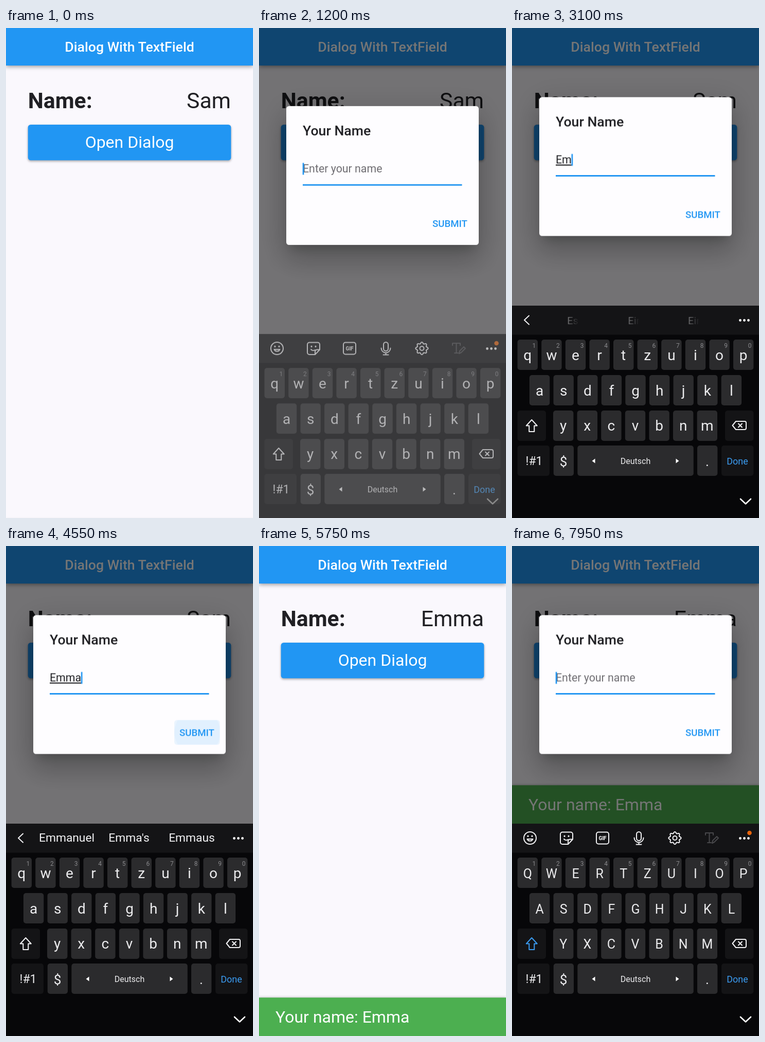
Animation of 480 by 953 pixels, one loop 8 s. Source, as an HTML page:

```html
<!DOCTYPE html>
<html lang="en">
<head>
<meta charset="utf-8">
<title>Dialog With TextField</title>
<style>
html, body { margin: 0; width: 100%; height: 100%; overflow: hidden; background: #faf8fd; }
body { position: relative; font-family: Roboto, "Liberation Sans", sans-serif; }
svg, .layer { position: absolute; left: 0; top: 0; width: 480px; height: 953px; overflow: visible; }
.mid { text-anchor: middle; }
.end { text-anchor: end; }
.medium { font-weight: 500; }
.ink { fill: #202024; }
.white { fill: #fff; }
.blue { fill: #2196f3; }
.line { fill: none; stroke: #f2f2f4; stroke-width: 2; stroke-linecap: round; stroke-linejoin: round; }
#bar { filter: drop-shadow(0 2px 4px rgba(0,0,0,.4)); }
#button { filter: drop-shadow(0 2px 2px rgba(0,0,0,.35)); }
#snack { filter: drop-shadow(0 -1px 2px rgba(0,0,0,.2)); }
#ripple { transform-origin: 240px 222px; }
#tap { transform-origin: 319px 228px; }
#shade { background: rgba(0,0,0,.54); }
#dialog {
  position: absolute; left: 53.3px; top: 340.5px; width: 373.4px; height: 270.5px;
  border-radius: 5.3px; background: #fefdff;
  box-shadow: 0 15px 20px -9px rgba(0,0,0,.2), 0 32px 50px 4px rgba(0,0,0,.14), 0 12px 61px 11px rgba(0,0,0,.12);
}
#dialog svg { width: 373.4px; height: 270.5px; }
.typed { text-decoration: underline; text-decoration-thickness: 1px; text-underline-offset: 2px; }
.key { fill: #2b2b2d; }
.dark { fill: #141416; }
.letter { fill: #ececee; text-anchor: middle; }
.digit { fill: #8a8a8d; font-size: 12px; text-anchor: middle; }
.words { position: absolute; left: 0; top: 540px; width: 480px; height: 56px; }
.words span {
  position: absolute; top: 0; width: 0; height: 56px; display: flex; justify-content: center;
  color: #f2f2f4; font-size: 22.8px; line-height: 56px; white-space: nowrap;
}
.early b {
  font-weight: 400;
  -webkit-mask: linear-gradient(90deg, #000 60px, transparent 84px) 0 0 / 150px 100% no-repeat;
}
</style>
</head>
<body>
<svg id="page">
  <rect id="bar" class="blue" width="480" height="73"/>
  <text class="mid medium white" x="240" y="46" font-size="26.67">Dialog With TextField</text>
  <text class="ink" x="42.7" y="156.3" font-size="42.67" font-weight="700">Name:</text>
  <text class="end ink" id="oldName" x="437" y="156.3" font-size="42.67">Sam</text>
  <text class="end ink" id="newName" x="437" y="156.3" font-size="42.67">Emma</text>
  <clipPath id="buttonClip"><rect x="42.7" y="188" width="394.6" height="69.3" rx="5.3"/></clipPath>
  <rect id="button" class="blue" x="42.7" y="188" width="394.6" height="69.3" rx="5.3"/>
  <g clip-path="url(#buttonClip)"><circle id="ripple" class="white" cx="240" cy="222" r="210"/></g>
  <text class="mid white" x="240" y="233.3" font-size="32">Open Dialog</text>
  <g id="snack">
    <rect x="0" y="878.3" width="480" height="75" fill="#4caf50"/>
    <text class="white" x="32" y="927" font-size="32">Your name: Emma</text>
  </g>
</svg>

<div class="layer" id="modal">
  <div class="layer" id="shade"></div>
  <div id="dialog">
    <svg>
      <text class="ink medium" x="32" y="57.3" font-size="26.67">Your Name</text>
      <g font-size="21.33" id="field">
        <text id="hint" x="32" y="129" fill="#6f6d72">Enter your name</text>
      </g>
      <g id="caretMove"><rect id="caret" class="blue" x="31.7" y="110.5" width="2.7" height="23"/></g>
      <rect x="32" y="152.5" width="309.4" height="1.4" fill="#918f94"/>
      <rect id="focusLine" class="blue" x="32" y="152" width="309.4" height="2.8"/>
      <clipPath id="submitClip"><rect x="274" y="204" width="88.7" height="48" rx="5.3"/></clipPath>
      <g clip-path="url(#submitClip)">
        <rect id="press" class="blue" x="274" y="204" width="88.7" height="48"/>
        <circle id="tap" class="blue" cx="319" cy="228" r="55"/>
      </g>
      <text class="mid medium blue" x="318" y="234.7" font-size="18.67">SUBMIT</text>
    </svg>
  </div>
</div>

<div class="layer" id="keyboard">
  <svg>
    <rect y="596" width="480" height="357" fill="#070709"/>
    <rect y="540" width="480" height="56.5" class="dark"/>
    <g id="tools" class="line">
      <circle cx="35" cy="568" r="12"/>
      <path d="M29.500 570a6 6 0 0 0 11 0z"/>
      <path d="M31 564v.5M39 564v.5M102 564v.5M110 564v.5" stroke-width="3"/>
      <path d="M98 556.500h16a4 4 0 0 1 4 4v10l-9 9.500h-11a4 4 0 0 1-4-4v-15.500a4 4 0 0 1 4-4zM118 570.500h-5a4 4 0 0 0-4 4v5M101 570a6 6 0 0 0 8 1"/>
      <rect x="164" y="556.500" width="24" height="23" rx="4"/>
      <text class="mid white" stroke="none" x="176" y="571.800" font-size="10" font-weight="700">GIF</text>
      <rect x="242" y="556" width="9" height="17" rx="4.500"/>
      <path d="M237.500 567.500a9 9 0 0 0 18 0M246.500 576.500v4M241.500 580.500h10"/>
      <path id="gear"/>
      <circle cx="316.500" cy="568" r="4"/>
      <path stroke="#48484b" style="stroke:#48484b" d="M376 562v-4h15v4M383.500 558v19M380 577h7M389 578l1-5 8-8 3 3-8 8z"/>
      <circle cx="461.500" cy="558" r="4.300" fill="#e8640c" stroke="none"/>
    </g>
    <path id="back" class="line" d="M33 559.500l-9 8.500 9 8.500"/>
    <g class="white"><circle cx="443.500" cy="568.500" r="2.400"/><circle cx="451.500" cy="568.500" r="2.400"/><circle cx="459.500" cy="568.500" r="2.400"/></g>
    <g id="keys"></g>
    <g id="lower" font-size="28"></g>
    <g id="upper" font-size="25"></g>
    <path class="line" d="M435 765h17a3 3 0 0 1 3 3v10a3 3 0 0 1-3 3h-17l-6.500-8zM440 769.500l7 7M447 769.500l-7 7"/>
    <path class="white" d="M161.500 837.500v9l-6-4.500zM318.500 837.500v9l6-4.500z"/>
    <g class="letter">
      <text x="43" y="850" font-size="23">!#1</text>
      <text x="100" y="851.500" font-size="26">$</text>
      <text x="379.500" y="852" font-size="26">.</text>
      <text x="240" y="848" font-size="16">Deutsch</text>
      <text x="438" y="848.500" font-size="18" style="fill:#3a9bf0">Done</text>
    </g>
  </svg>
  <div class="words early" id="early"></div>
  <div class="words" id="late"></div>
</div>
<svg><path id="chevron" class="line" d="M444 916l10 9.500 10-9.500" style="stroke-width:2.6"/></svg>

<script>
const LOOP = 8000;
const OPEN = [875, 6575];               // moments the dialog starts to open
const CLOSE = 4650;
const QUAD_OUT = 'animation-timing-function:cubic-bezier(.33,.67,.67,1);';
const $ = id => document.getElementById(id);
const rules = [];

// Frames are [ms, declarations]; the last state holds to the loop's end.
function track(sel, frames, timing = 'linear') {
  const name = 'k' + rules.length;
  const all = [...frames, [LOOP, frames[frames.length - 1][1]]];
  const body = all.map(([ms, rule]) => `${ms * 100 / LOOP}%{${rule}}`).join('');
  rules.push(`@keyframes ${name}{${body}}${sel}{animation:${name} ${LOOP}ms ${timing} infinite}`);
}

function show(sel, ...spans) {
  const frames = spans[0][0] > 0 ? [[0, 'opacity:0']] : [];
  for (const [from, to] of spans) {
    frames.push([from, 'opacity:1']);
    if (to < LOOP) frames.push([to, 'opacity:0']);
  }
  track(sel, frames, 'step-end');
}

const moveY = y => `transform:translateY(${y}px);`;
const each = fn => OPEN.map(fn);

// Keyboard parts
const rows = [['qwertzuiop', 30.3, 606, 646], ['asdfghjkl', 53.6, 675, 714.5], ['yxcvbnm', 99.7, 744, 783]];
const key = (x, y, w, kind = 'key') => `<rect class="${kind}" x="${x}" y="${y}" width="${w}" height="59" rx="5"/>`;
let caps = '', lower = '', upper = '';
for (const [letters, x0, top, base] of rows) {
  [...letters].forEach((ch, i) => {
    const x = x0 + i * 46.6;
    caps += key(x - 19.7, top, 39.4);
    if (top === 606) caps += `<text class="digit" x="${x + 12.5}" y="622">${(i + 1) % 10}</text>`;
    lower += `<text class="letter" x="${x}" y="${base}">${ch}</text>`;
    upper += `<text class="letter" x="${x}" y="${base}">${ch.toUpperCase()}</text>`;
  });
}
caps += key(10.5, 744, 55.5, 'dark') + key(414, 744, 55.5, 'dark') + key(10.5, 812, 62.5, 'dark')
  + key(80.7, 812, 39.3) + key(127.3, 812, 225.5) + key(360, 812, 39.4) + key(407, 812, 62.5, 'dark');
const shift = color => `<path class="line" style="stroke:${color}" d="M38.300 762l-10.500 11.500h5.500v11.500h10v-11.500h5.500z"/>`;
$('keys').innerHTML = caps;
$('lower').innerHTML = lower + shift('#f2f2f4');
$('upper').innerHTML = upper + shift('#3a9bf0');

let gear = '';
for (let i = 0; i < 64; i++) {
  const a = i * Math.PI / 32, r = 10.7 + 1.5 * Math.cos(8 * a);
  gear += `${i ? 'L' : 'M'}${(316.5 + r * Math.cos(a)).toFixed(1)} ${(568 + r * Math.sin(a)).toFixed(1)}`;
}
$('gear').setAttribute('d', gear + 'z');

const fillWords = (id, words) => {
  $(id).innerHTML = words.map((w, i) => `<span style="left:${118 + i * 121.3}px"><b style="font-weight:400">${w}</b></span>`).join('');
};
fillWords('early', ['Es', 'Ein', 'Eine']);
fillWords('late', ['Emmanuel', "Emma's", 'Emmaus']);

// Typing
const typing = [['E', 2300, 12.1], ['Em', 2850, 30.8], ['Emm', 3200, 49.5], ['Emma', 3500, 61.1]];
typing.forEach(([text, at], i) => {
  $('field').insertAdjacentHTML('beforeend', `<text class="ink typed" id="typed${i}" x="32" y="129">${text}</text>`);
  show('#typed' + i, [at, i < 3 ? typing[i + 1][1] : 4850]);
});
show('#hint', [0, 2300], [4850, LOOP]);
track('#caretMove', [[0, 'transform:none'],
  ...typing.map(([, at, x]) => [at, `transform:translateX(${x}px)`]), [4850, 'transform:none']], 'step-end');
show('#caret', [0, 1500], [2000, 4000], [4500, 7200], [7700, LOOP]);

// Page
show('#oldName', [0, 4700]);
show('#newName', [4700, LOOP]);
track('#ripple', [[0, 'opacity:0;transform:scale(0)'], ...each(s => [
  [s - 271, 'opacity:0;transform:scale(0)'],
  [s - 270, 'opacity:.22;transform:scale(.1);' + QUAD_OUT],
  [s, 'opacity:.22;transform:scale(1)'],
  [s + 130, 'opacity:.22;transform:scale(1)'],
  [s + 320, 'opacity:0;transform:scale(1)'],
]).flat()]);
track('#snack', [[0, moveY(78)], [4800, moveY(78) + 'animation-timing-function:cubic-bezier(.4,0,.2,1)'],
  [5050, moveY(0)], [6829, moveY(0)], [6830, moveY(-413)]]);

// Dialog
const fade = s => [[s, 'opacity:0;' + QUAD_OUT], [s + 150, 'opacity:1']];
track('#modal', [[0, 'opacity:0'], ...fade(OPEN[0]), [CLOSE, 'opacity:1'], [CLOSE + 150, 'opacity:0'], ...fade(OPEN[1])]);
const lift = s => [[s + 255, moveY(0) + QUAD_OUT], [s + 355, moveY(-206.5)]];
track('#dialog', [[0, moveY(0)], ...lift(OPEN[0]), [4809, moveY(-206.5)], [4810, moveY(0)], ...lift(OPEN[1])]);
const focus = s => [[s + 150, 'opacity:0'], [s + 310, 'opacity:1']];
track('#focusLine', [[0, 'opacity:0'], ...focus(OPEN[0]), [4809, 'opacity:1'], [4810, 'opacity:0'], ...focus(OPEN[1])]);
track('#press', [[0, 'opacity:0'], [4400, 'opacity:0'], [4500, 'opacity:.09'], [4809, 'opacity:.09'], [4810, 'opacity:0']]);
track('#tap', [[0, 'opacity:0;transform:scale(0)'], [4400, 'opacity:0;transform:scale(0)'],
  [4450, 'opacity:.04;transform:scale(.4)'], [4560, 'opacity:.04;transform:scale(.85)'],
  [4650, 'opacity:.04;transform:scale(1)'], [4810, 'opacity:0;transform:scale(1)']]);

// Keyboard
const rise = s => [[s + 230, 'opacity:0'], [s + 409, 'opacity:1']];
const slide = s => [[s + 230, moveY(146) + QUAD_OUT], [s + 480, moveY(0)]];
track('#keyboard', [[0, 'opacity:0'], ...rise(OPEN[0]), [4750, 'opacity:1'], [4900, 'opacity:0'], ...rise(OPEN[1])]);
track('#keyboard>*', [[0, moveY(146)], ...slide(OPEN[0]), [4750, moveY(0)], [4950, moveY(146)], ...slide(OPEN[1])]);
const tint = s => [[s + 75, 'opacity:0;stroke:#111'], [s + 120, 'opacity:1;stroke:#111'],
  [s + 200, 'opacity:1;stroke:#222'], [s + 325, 'opacity:1;stroke:#888'], [s + 480, 'opacity:1;stroke:#fff']];
track('#chevron', [[0, 'opacity:0;stroke:#111'], ...tint(OPEN[0]),
  [4750, 'opacity:1;stroke:#fff'], [4900, 'opacity:0;stroke:#fff'], ...tint(OPEN[1])]);
show('#upper', [1400, 2350], [7100, LOOP]);
show('#lower', [0, 1400], [2350, 7100]);

// Suggestion strip
show('#tools', [0, 2800], [4950, LOOP]);
show('#back', [2800, 4950]);
const word = (o, y, k) => `opacity:${o};transform:translateY(${y}px) scale(${k})`;
track('#early span', [[0, word(0, 2, .85)], [3050, word(0, 2, .85)], [3100, word(.38, 2, .88)],
  [3210, word(1, 0, 1)], [3600, word(1, 0, 1)], [3650, word(0, 0, 1)]]);
track('#early b', [[0, '-webkit-mask-position:-84px 0'], [3050, '-webkit-mask-position:-84px 0'],
  [3210, '-webkit-mask-position:0 0']]);
track('#late span', [[0, word(0, 2, .85)], [3650, word(0, 2, .85)], [3800, word(1, 0, 1)],
  [4949, word(1, 0, 1)], [4950, word(0, 0, 1)]]);

const sheet = document.createElement('style');
sheet.textContent = rules.join('\n');
document.head.append(sheet);
</script>
</body>
</html>
```
